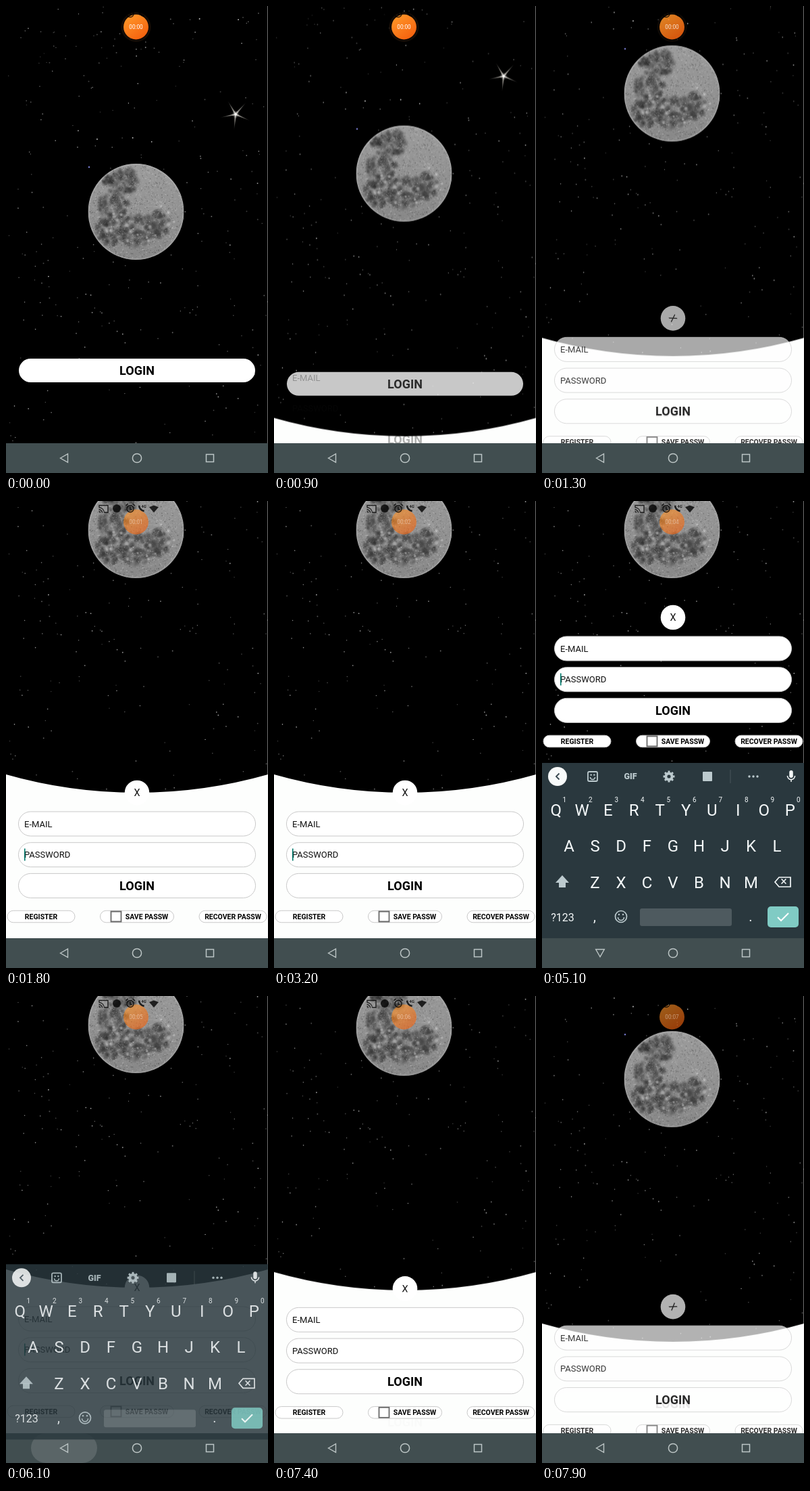
These frames come from a looping animation (388 px wide and 690 px high, 8000 ms). An HTML page with a canvas:

```html
<!DOCTYPE html>
<html lang="en">
<head>
<meta charset="utf-8">
<title>Moon login</title>
<style>
html, body { margin: 0; width: 100%; height: 100%; overflow: hidden; background: #fff; }
canvas { display: block; }
</style>
</head>
<body>
<canvas id="stage" width="388" height="690"></canvas>
<script>
const W = 388, H = 690, LOOP = 8000, NAV = 646, KEYS_TOP = 387;
const RISE = 261, LIFT = 92, TAU = Math.PI * 2;
const PAPER = '#fdfefd', INK = '#111';
const stage = document.getElementById('stage').getContext('2d');
let g = stage;

const clamp = v => Math.max(0, Math.min(1, v));
const span = (t, a, b) => clamp((t - a) / (b - a));
const smooth = u => u * u * (3 - 2 * u);

function randomizer(seed) {
  return () => (seed = (seed * 16807) % 2147483647) / 2147483647;
}

function text(s, x, y, size, color, weight = 400, align = 'center') {
  g.font = `${weight} ${size}px Roboto, sans-serif`;
  g.textAlign = align;
  g.textBaseline = 'middle';
  g.fillStyle = color;
  g.fillText(s, x, y + size * 0.06);
}

function disc(x, y, r, color) {
  g.fillStyle = color;
  g.beginPath();
  g.arc(x, y, r, 0, TAU);
  g.fill();
}

function ring(x, y, r, color, width, from = 0, to = TAU) {
  g.strokeStyle = color;
  g.lineWidth = width;
  g.beginPath();
  g.arc(x, y, r, from, to);
  g.stroke();
}

function path(points, close) {
  g.beginPath();
  points.forEach(([x, y]) => g.lineTo(x, y));
  if (close) g.closePath();
}

function fillPath(color, points) {
  g.fillStyle = color;
  path(points, true);
  g.fill();
}

function line(color, width, points, close) {
  g.strokeStyle = color;
  g.lineWidth = width;
  path(points, close);
  g.stroke();
}

// Box given by its centre.
function box(cx, cy, w, h, r, fill, stroke, width = 1) {
  g.beginPath();
  g.roundRect(cx - w / 2, cy - h / 2, w, h, r);
  if (fill) { g.fillStyle = fill; g.fill(); }
  if (stroke) { g.strokeStyle = stroke; g.lineWidth = width; g.stroke(); }
}

function glow(x, y, r, rgb, alpha) {
  const grad = g.createRadialGradient(x, y, 0, x, y, r);
  grad.addColorStop(0, `rgba(${rgb},${alpha})`);
  grad.addColorStop(1, `rgba(${rgb},0)`);
  disc(x, y, r, grad);
}

function drawStars() {
  const rnd = randomizer(4127);
  for (let i = 0; i < 290; i++) {
    const v = i % 20 ? 55 + 90 * rnd() : 190;
    disc(rnd() * W, rnd() * H, 0.6 + rnd() * 0.4, `rgb(${v},${v},${v})`);
  }
  disc(123, 238, 1.2, '#7c80d8');
}

function drawFlare(x, y) {
  for (let i = 0; i < 5; i++) {
    g.save();
    g.translate(x, y);
    g.rotate(-2.1 + i * TAU / 5);
    const grad = g.createLinearGradient(0, 0, 24, 0);
    grad.addColorStop(0, 'rgba(240,235,225,.75)');
    grad.addColorStop(1, 'rgba(240,235,225,0)');
    fillPath(grad, [[0, -1.4], [24, 0], [0, 1.4]]);
    g.restore();
  }
  glow(x, y, 6, '255,255,255', 0.5);
  disc(x, y, 1.5, '#fff');
}

function drawMoon(x, y, r) {
  const rnd = randomizer(977);
  g.save();
  g.beginPath();
  g.arc(x, y, r, 0, TAU);
  g.clip();
  const base = g.createLinearGradient(x, y - r, x, y + r);
  base.addColorStop(0, '#9c9c9c');
  base.addColorStop(1, '#888');
  g.fillStyle = base;
  g.fillRect(x - r, y - r, 2 * r, 2 * r);

  // Dark seas: ragged clusters around a few centres.
  const seas = [[-41, -45, 8], [-17, -46, 20], [-33, -10, 22], [-38, 28, 22], [0, 28, 24], [32, 18, 19]];
  for (const [dx, dy, size] of seas) {
    for (let i = 0; i < size * 5; i++) {
      const a = rnd() * TAU, d = size * Math.sqrt(rnd());
      glow(x + dx + Math.cos(a) * d, y + dy + Math.sin(a) * d, 2 + rnd() * 5, '45,45,45', 0.32);
    }
  }
  for (let i = 0; i < 3000; i++) {
    const a = rnd() * TAU, d = r * Math.sqrt(rnd()), s = 0.6 + rnd() * 1.2;
    g.fillStyle = `rgba(${rnd() > 0.45 ? '230,230,230' : '25,25,25'},${rnd() * 0.3})`;
    g.fillRect(x + Math.cos(a) * d, y + Math.sin(a) * d, s, s);
  }
  for (let i = 0; i < 18; i++) {
    const a = rnd() * TAU, d = r * (0.3 + rnd() * 0.6);
    glow(x + Math.cos(a) * d, y + Math.abs(Math.sin(a)) * d, 2 + rnd() * 3, '220,220,220', 0.6);
  }
  for (let i = 0; i < 14; i++) {
    const a = i / 14 * TAU, d = 8 + rnd() * 18, cx = x + 37, cy = y - 8;
    line('rgba(215,215,215,.2)', 1, [[cx, cy], [cx + Math.cos(a) * d, cy + Math.sin(a) * d]]);
  }
  ring(x, y, r - 1, 'rgba(200,200,200,.3)', 2);
  g.restore();
}

// The sky ends in a shallow arc at the bottom.
function makeSky() {
  const layer = document.createElement('canvas');
  layer.width = W;
  layer.height = 694;
  g = layer.getContext('2d');
  const sag = 27, radius = (194 * 194 + sag * sag) / (2 * sag), half = Math.asin(194 / radius);
  g.beginPath();
  g.moveTo(0, 0);
  g.lineTo(W, 0);
  g.arc(194, 692 - radius, radius, Math.PI / 2 - half, Math.PI / 2 + half);
  g.closePath();
  g.clip();
  g.fillStyle = '#000';
  g.fillRect(0, 0, W, 694);
  drawStars();
  drawFlare(340, 160);
  drawMoon(192.5, 304, 71);
  g = stage;
  return layer;
}
const sky = makeSky();

function drawForm(p, dy, caret) {
  const fillAlpha = clamp((p - 0.22) / 0.68), inkAlpha = 1 - (1 - p) ** 1.5;
  const pill = (cx, cy, w, h) => {
    g.globalAlpha = fillAlpha;
    box(cx, cy, w, h, h / 2, '#fff', '#c9c9c9');
    g.globalAlpha = inkAlpha;
  };
  g.save();
  g.translate(0, dy);

  g.globalAlpha = fillAlpha;
  disc(194, 431, 18.3, '#fff');
  g.save();
  g.globalAlpha = Math.min(fillAlpha * 1.3, 1);
  g.translate(194, 431);
  g.rotate(Math.PI * (1 - p));
  text('X', 0, 0, 14.5, INK);
  g.restore();

  ['E-MAIL', 'PASSWORD', 'LOGIN'].forEach((label, i) => {
    const y = 477 + i * 45.7;
    pill(194, y, 351, 36);
    if (i < 2) text(label, 27, y, 13, INK, 400, 'left');
    else text(label, 194, y, 18, '#000', 700);
  });
  if (caret) {
    g.fillStyle = '#00796b';
    g.fillRect(27, 513.5, 1.6, 18);
  }
  ['REGISTER', 'SAVE PASSW', 'RECOVER PASSW'].forEach((label, i) => {
    const cx = 52 + i * 142;
    pill(cx, 614, i === 1 ? 109 : 100, 17.5);
    text(label, i === 1 ? 208.5 : cx, 614, 10.5, '#000', 700);
  });
  box(163, 614, 15, 15, 0, null, '#6a6a6a', 1.8);
  g.restore();
}

function drawRecorder(t) {
  const fade = span(t, 1200, 1500);
  const sec = Math.max(0, Math.floor((t - 800) / 1000));
  g.save();
  g.globalAlpha = 1 - fade;
  ring(192.5, 31, 20.5, 'rgba(28,18,10,.75)', 3);
  g.globalAlpha = 1 - 0.38 * fade;
  const grad = g.createLinearGradient(180, 14, 204, 48);
  grad.addColorStop(0, '#ff9628');
  grad.addColorStop(1, '#f4600e');
  disc(192.5, 31, 18.5, grad);
  text('00:0' + sec, 192.5, 31, 8.2, `rgba(255,255,255,${1 - 0.3 * fade})`);
  g.restore();
}

function drawStatus() {
  const c = 'rgba(0,0,0,.8)';
  line(c, 1.4, [[138, 9], [138, 6.5], [151, 6.5], [151, 17], [146, 17]]);
  for (let r = 2; r < 9; r += 3) ring(137.5, 17.5, r, c, 1.3, -Math.PI / 2, 0);
  disc(164, 11, 6, c);
  ring(184, 11.5, 5, c, 1.4);
  line(c, 1.2, [[184, 8.5], [184, 12], [186.5, 13]]);
  ring(184, 11.5, 8, c, 1.5, -2.5, -2);
  ring(184, 11.5, 8, c, 1.5, -1.1, -0.6);
  ring(206, 6, 9, c, 2.6, Math.PI * 0.55, Math.PI * 0.98);
  text('4G', 204, 8, 6, c, 700);
  fillPath(c, [[212, 9], [219, 6.5], [226, 9], [219, 17]]);
}

function drawNav(t) {
  const c = '#bcc5c5';
  g.fillStyle = '#414e50';
  g.fillRect(0, NAV, W, H - NAV);
  const press = span(t, 5800, 5950) * (1 - span(t, 6150, 6450));
  if (press) box(86, 668, 98, 44, 22, `rgba(255,255,255,${0.13 * press})`);
  g.save();
  g.translate(86, 668);
  if (t >= 4400 && t < 5950) g.rotate(-Math.PI / 2);
  line(c, 1.4, [[-5.5, 0], [5.5, -6.3], [5.5, 6.3]], true);
  g.restore();
  ring(194, 668, 6.6, c, 1.5);
  box(302, 668, 11, 11, 0, null, c, 1.5);
}

function drawSmile(x, y, r, color) {
  ring(x, y + 1, r / 2, color, 1.6, 0, Math.PI);
  disc(x - r / 3, y - r / 3, 1.2, color);
  disc(x + r / 3, y - r / 3, 1.2, color);
}

function drawToolbar(y, c, bright) {
  disc(23, y, 14, '#f8fafa');
  line('#37474f', 1.8, [[25.5, y - 4.5], [21, y], [25.5, y + 4.5]]);
  box(75, y, 14, 14, 2, null, c, 1.8);
  drawSmile(75, y, 7, c);
  text('GIF', 131, y, 12.5, c, 900);
  ring(188, y, 4.6, c, 4);
  for (let i = 0; i < 8; i++) ring(188, y, 7, c, 3, i * TAU / 8 - 0.2, i * TAU / 8 + 0.2);
  box(245, y, 14, 14, 1, c);
  box(279, y, 1, 20, 0, 'rgba(255,255,255,.15)');
  for (let i = -1; i < 2; i++) disc(313 + i * 6, y, 1.7, c);
  box(369, y - 3.5, 5.5, 11, 2.7, bright);
  ring(369, y - 1, 5.6, bright, 1.5, 0, Math.PI);
  box(369, y + 6.5, 1.5, 3, 0, bright);
}

function drawKeyboard(t) {
  const enter = span(t, 4600, 4850), leave = span(t, 5950, 6300);
  if (!enter || leave === 1) return;
  const c = '#f4f8f9', soft = '#bccace';
  g.save();
  g.globalAlpha = enter * (1 - 0.8 * leave * leave);
  g.translate(0, KEYS_TOP + 120 * (1 - enter) ** 2 + 50 * leave * leave);
  g.fillStyle = '#2a383e';
  g.fillRect(0, 0, W, NAV - KEYS_TOP);
  drawToolbar(20, soft, c);

  ['QWERTYUIOP', 'ASDFGHJKL', 'ZXCVBNM'].forEach((row, n) => {
    const x0 = 194 - (row.length - 1) * 19.25;
    [...row].forEach((key, i) => {
      const x = x0 + i * 38.5;
      text(key, x, 69 + n * 53.5, 24, c);
      if (n === 0) text((i + 1) % 10, x + 12.5, 54, 10, c);
    });
  });

  fillPath(soft, [[30, 166], [40, 177], [20, 177]]);
  box(30, 180, 10, 8, 0, soft);
  line(c, 1.7, [[345, 176], [351, 169], [368, 169], [368, 183], [351, 183]], true);
  text('×', 358, 175, 18, c);

  text('?123', 30.5, 228, 16, c);
  text(',', 78, 227, 20, c);
  ring(117, 227, 8.5, soft, 1.7);
  drawSmile(117, 227, 9, soft);
  box(213, 228, 136, 26, 3, 'rgba(255,255,255,.17)');
  text('.', 309, 227, 20, c);
  box(357, 227.5, 46, 31, 5, '#80cbc4');
  line('#fff', 2, [[349, 228], [354, 233], [365, 222]]);
  g.restore();
}

function draw(t) {
  const p = smooth(span(t, 520, 1790)) * (1 - smooth(span(t, 7280, 8970)));
  const resized = t >= 4400 && t < 5950;
  const formShown = p > 0 && !(resized && t < 4600);
  const blink = t < 2100 || Math.floor((t - 4900) / 500) % 2 === 0;
  const caret = t > 1500 && t < 7400 && blink;

  g.globalAlpha = 1;
  g.fillStyle = PAPER;
  g.fillRect(0, 0, W, H);
  g.drawImage(sky, 0, -RISE * p);

  g.save();
  g.globalAlpha = 1 - p;
  g.translate(0, LIFT * p);
  box(194, 538.5, 350, 35, 17.5, '#fff');
  text('LOGIN', 194, 539, 18, '#000', 700);
  g.restore();

  if (resized) {
    g.fillStyle = PAPER;
    g.fillRect(0, KEYS_TOP, W, NAV - KEYS_TOP);
  }
  if (formShown) drawForm(p, resized ? KEYS_TOP - NAV : LIFT * (1 - p), caret);

  drawRecorder(t);
  drawStatus();
  g.fillStyle = 'rgba(225,225,225,.7)';
  g.fillRect(387.3, 0, 0.7, NAV);
  drawNav(t);
  drawKeyboard(t);
}

function tick() {
  draw(performance.now() % LOOP);
  requestAnimationFrame(tick);
}
tick();
</script>
</body>
</html>
```
